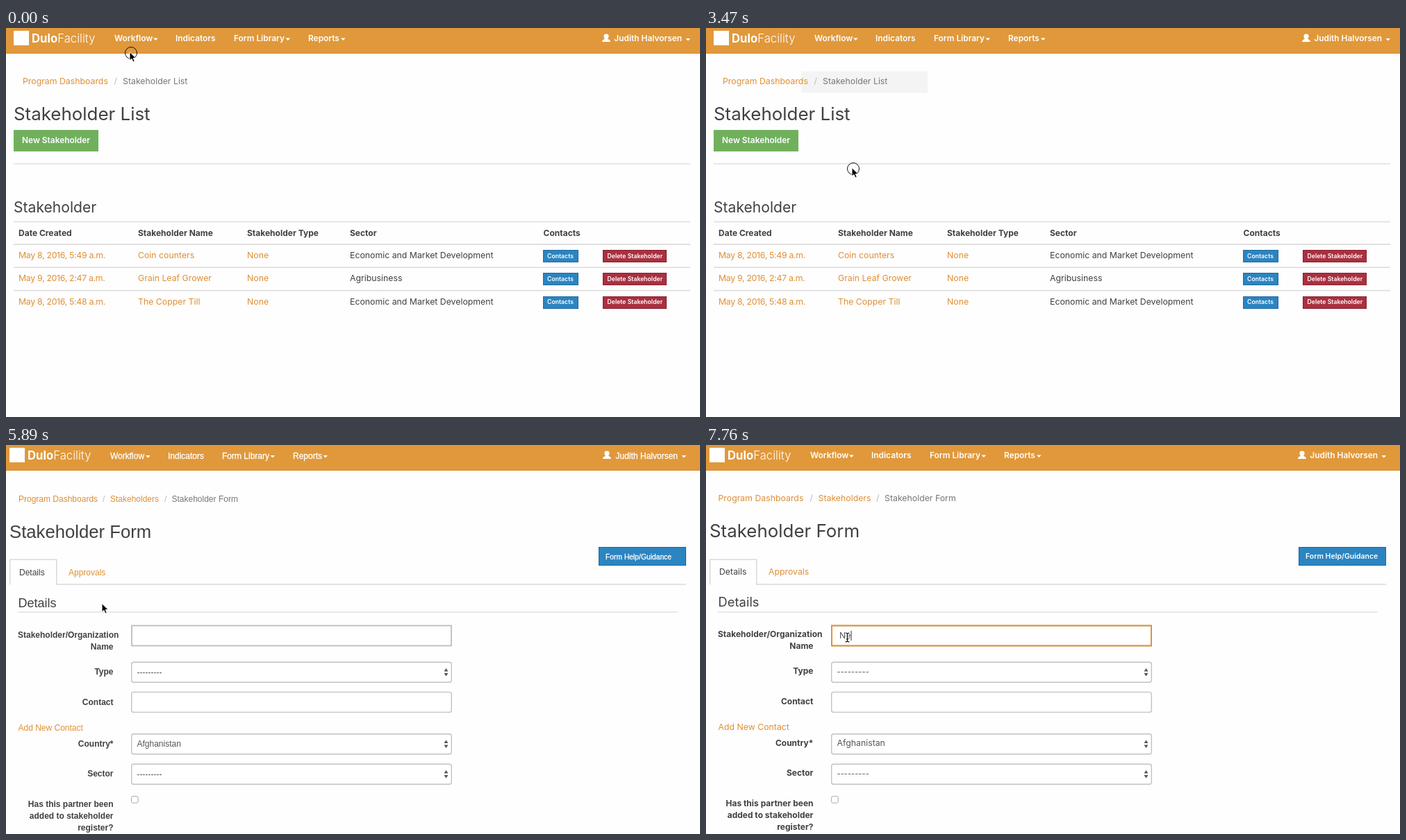
Recreate the animation shown at these times as an HTML page. Size 999 by 561 pixels, loop 8 s.

```html
<!DOCTYPE html>
<html lang="en">
<head>
<meta charset="utf-8">
<title>Stakeholder form</title>
<style>
html, body { margin: 0; width: 100%; height: 100%; overflow: hidden; background: #fefefe; }
svg { display: block; width: 999px; height: 561px; }
text { font: 400 12.3px Inter, sans-serif; font-optical-sizing: none; fill: #404040; white-space: pre; }
.link { fill: #de8f35; }
.date { letter-spacing: -.3px; }
.muted { fill: #777; }
.slash { fill: #bbb; }
.bold { font-weight: 700; font-size: 12px; }
.end { text-anchor: end; }
.h2 { font-size: 25.9px; }
.h3 { font-size: 21.1px; }
.legend { font-size: 18.4px; }
.field { fill: #555; }
.dash { font-size: 11.2px; }
.nav, .btn { fill: #fff; font-weight: 600; font-size: 11.9px; }
.small { font-size: 8.7px; }
.help { font-size: 10.5px; }
.sys text { font-family: "Liberation Sans", Arial, sans-serif; font-size: 12px; transform: translateY(1px); }
.sys .h2 { font-size: 25.7px; transform: translateY(1.5px); }
.sys .legend { font-size: 18px; }
.sys .help { font-size: 10.3px; }
.sys .nav, .sys .btn { font-weight: 400; stroke: #fff; stroke-width: .3px; }
.sys .logo { font-family: Inter, sans-serif; transform: none; }
text.logo, .sys text.logo { font-size: 16.7px; font-weight: 300; fill: #fff; }
.logo tspan { font-weight: 700; }
</style>
</head>
<body>
<svg id="stage" viewBox="0 0 999 561" xmlns="http://www.w3.org/2000/svg"></svg>
<script>
const LOOP = 8000;
const stage = document.getElementById('stage');

const text = (x, y, s, cls = '') => `<text x="${x}" y="${y}" class="${cls}">${s}</text>`;
const rect = (x, y, w, h, fill, extra = '') =>
  `<rect x="${x}" y="${y}" width="${w}" height="${h}" fill="${fill}" ${extra}/>`;
const path = (d, fill, extra = '') => `<path d="${d}" fill="${fill}" ${extra}/>`;
const group = (id, body, extra = '') => `<g id="${id}" ${extra}>${body}</g>`;
const line = (x1, x2, y, color = '#ddd', w = 1.6) => rect(x1, y - w / 2, x2 - x1, w, color);
const caret = (x, y = 14.5) => path(`M${x} ${y}h6.6l-3.3 3.5z`, '#fff');
const button = (x, y, w, h, fill, edge) =>
  rect(x + .5, y + .5, w - 1, h - 1, fill, `stroke="${edge}"`);

// Label, x and caret x, for the web font and for the system font
const NAV = [
  ['Workflow', [156, 212], [156, 207]],
  ['Indicators', [244], [239]],
  ['Form Library', [328, 402.5], [317, 386.5]],
  ['Reports', [435, 482], [419, 462.5]],
];

function navBar(shift, sys) {
  const items = NAV.map(([label, web, fallback]) => {
    const [x, cx] = sys ? fallback : web;
    return text(x, 19, label, 'nav') + (cx ? caret(cx, sys ? 15 : 14.5) : '');
  }).join('');
  const ux = sys ? 865 : 858;
  const user = path(`M${ux} 20q0-3 4-4.2q-1.6-1.5-1.6-4q0-3.4 3.6-3.4t3.6 3.4q0 2.5-1.6 4q4 1.2 4 4.2z`, '#fff');
  return `<g transform="translate(${shift})">` + rect(11, 4, 22, 21, '#fff') +
    text(37, 20.5, '<tspan>Dulo</tspan>Facility', 'logo') + items + user +
    text(973, 19, 'Judith Halvorsen', 'nav end') + caret(978.5, 15) + '</g>';
}

const crumbs = list => list.map(([x, s, cls]) => text(x, 81, s, cls)).join('');

const ROWS = [
  ['May 8, 2016, 5:49 a.m.', 'Coin counters', 'Economic and Market Development'],
  ['May 9, 2016, 2:47 a.m.', 'Grain Leaf Grower', 'Agribusiness'],
  ['May 8, 2016, 5:48 a.m.', 'The Copper Till', 'Economic and Market Development'],
];
const HEADS = [[18, 'Date Created'], [190, 'Stakeholder Name'], [347, 'Stakeholder Type'],
  [495, 'Sector'], [773.5, 'Contacts']];

function listPage() {
  const rows = ROWS.map(([date, name, sector], i) => {
    const y = 332 + i * 33.3;
    const top = Math.round(y - 12);
    return text(18, y, date, 'link date') + text(190, y, name, 'link') + text(347, y, 'None', 'link') +
      text(495, y, sector) +
      button(773, top, 51, 18, '#2b85c1', '#1d6aa1') + text(779, y - .5, 'Contacts', 'btn small') +
      button(859, top, 92, 18, '#aa3040', '#8a2030') + text(865.5, y - .5, 'Delete Stakeholder', 'btn small') +
      (i ? line(11, 985, y - 20) : '');
  }).join('');
  return group('crumbBg', rect(137, 62.5, 182, 31, '#f4f4f4')) +
    group('navHot', rect(143.5, 0, 88, 37, '#ba7f31')) + navBar(0, false) +
    crumbs([[24, 'Program Dashboards', 'link'], [155.5, '/', 'slash'], [168, 'Stakeholder List', 'muted']]) +
    text(11, 132.5, 'Stakeholder List', 'h2') +
    rect(11, 147, 122, 31, '#70b05c') +
    group('btnHot', button(11, 147, 122, 31, '#5b9545', '#3e7a30')) +
    text(23, 166, 'New Stakeholder', 'btn') +
    line(11, 985, 195.7, '#e2e2e2') + text(11, 265.5, 'Stakeholder', 'h3') +
    line(11, 985, 279.5) + HEADS.map(([x, s]) => text(x, 299.5, s, 'bold')).join('') +
    line(11, 985, 312, '#d8d8d8') + rows + group('menu', menu());
}

function menu() {
  const items = ['Program Dashboard', 'Documents', 'Sites', 'Stakeholders'].map((s, i) => {
    const y = 57 + i * 22.3;
    let icon = `<circle cx="168" cy="${y - 4.7}" r="5.2" fill="none" stroke="#404040" stroke-width="1.5"/>` +
      path(`M168 ${y - 4}l-2-3.5`, 'none', 'stroke="#404040" stroke-width="1.3"');
    if (i) icon = [0, 1, 2, 3].map(k => {
      const ry = y - 9.5 + k * 2.7;
      return rect(162, ry, 2.4, 1.9, '#404040') + rect(165.4, ry, 9, 1.9, '#404040');
    }).join('');
    return icon + text(177, y, s);
  }).join('');
  return rect(144.5, 37.5, 169, 99.5, '#fff',
    'stroke="#c8c8c8" style="filter:drop-shadow(0 4px 4px rgba(0,0,0,.2))"') +
    group('menuHot', rect(145, 109.5, 168, 22.5, '#f4f4f4')) + items;
}

const formTop = (x, sys) => navBar(x - 11, sys) + crumbs(sys
  ? [[x + 13, 'Program Dashboards', 'link'], [x + 134, '/', 'slash'], [x + 145, 'Stakeholders', 'link'],
    [x + 223, '/', 'slash'], [x + 233.5, 'Stakeholder Form', 'muted']]
  : [[17.5, 'Program Dashboards', 'link'], [149.5, '/', 'slash'], [161.5, 'Stakeholders', 'link'],
    [245, '/', 'slash'], [257, 'Stakeholder Form', 'muted']]) +
  text(x, 132.5, 'Stakeholder Form', 'h2');

const LABELS = [[294, 'Name'], [330, 'Type'], [374, 'Contact'], [434, 'Country*'], [477, 'Sector'],
  [521, 'Has this partner been'], [538, 'added to stakeholder'], [555, 'register?']];

function box(y, value, cls = '') {
  const arrows = path(`M630.5 ${y + 14}l3-4.5 3 4.5zm0 2.5h6l-3 4.5z`, '#555');
  return rect(180.7, y + .7, 460.6, 29, '#fff', 'rx="3" stroke="#c2c2c2" stroke-width="1.4"') +
    (value ? text(188.5, y + 18, value, 'field ' + cls) + arrows : '');
}

function formPage(sys) {
  return formTop(5, sys) +
    button(853, 147, 126, 27, '#2b85c1', '#1d6aa1') + text(863, 163.5, 'Form Help/Guidance', 'btn help') +
    path('M5.7 201.5V165.2H72.8V201H979', 'none', 'stroke="#d9d9d9" stroke-width="1.5"') +
    text(19, 186.5, 'Details') + text(90, 186.5, 'Approvals', 'link') +
    text(17.5, 233, 'Details', 'legend') + line(17, 967, 241, '#e4e4e4') +
    text(17, 277, 'Stakeholder/Organization', 'bold') +
    LABELS.map(([y, s]) => text(154.5, y, s, 'bold end')).join('') +
    rect(181, 260.5, 460, 29, '#fff', 'stroke="#bdbdbd" stroke-width="1.8"') +
    box(312.5, '---------', 'dash') + box(355.7) + box(416, 'Afghanistan') + box(459.5, '---------', 'dash') +
    text(17.5, 410.5, 'Add New Contact', 'link') +
    rect(180.6, 506.6, 9.6, 9.6, '#fff', 'rx="2" stroke="#aaa"');
}

const CURSORS = {
  arrow: path('M-2-1.5V11L.9 8.3 3 13l2.2-1-2-4.4H7.2z', '#000', 'stroke="#fff" stroke-width="1"'),
  hand: path('M-1.3 7.5V1.6Q-1.3.4 0 .4T1.3 1.6V5.6Q2.3 4.6 3.3 5.7 4.5 5 5.2 6.3 6.8 6 6.8 7.7V10.4Q6.5 12.5 5.5 14.5H-.2Q-1.5 11.6-4 9-4.5 7.3-2.9 7.4z',
    '#fff', 'stroke="#000" stroke-width="1.1" stroke-linejoin="round"') +
    path('M1 9v3M3 9v3M5 9v3', 'none', 'stroke="#000" stroke-width=".7"'),
  beam: ['#fff" stroke-width="2.6', '#111" stroke-width="1.2'].map(s =>
    path('M-2.8-6.5Q0-6.5 0-4.8 0-6.5 2.8-6.5M0-5V5M-2.8 6.5Q0 6.5 0 4.8 0 6.5 2.8 6.5M-1.7 2.5H1.7',
      'none', `stroke="${s}"`)).join(''),
};

stage.innerHTML = rect(0, 0, 999, 561, '#fefefe') + rect(0, 0, 999, 37, '#e0983b') +
  rect(0, 36, 999, 1, '#d88e30') +
  group('list', listPage()) +
  group('loading', formTop(11, true), 'class="sys"') +
  group('plain', formPage(true), 'class="sys"') +
  group('form', formPage(false)) +
  group('focus', rect(181, 260.5, 460, 29, 'none', 'stroke="#e0933a" stroke-width="2"')) +
  group('suggest', rect(180.5, 290.5, 461, 102, '#fff', 'stroke="#c8c8c8"')) +
  text(192, 279, '', 'field typed') +
  group('bar', rect(0, 268, 1, 14, '#333')) +
  group('pointer', '<circle id="ring" r="8.5" fill="none" stroke="#111"/>' +
    Object.entries(CURSORS).map(([id, body]) => group(id, body)).join(''));

// Each step changes only the listed values
const STEPS = [
  [0, { page: 'list', cursor: 'arrow', at: [180, 36], ring: 1, typed: '', bar: 0 }],
  [260, { cursor: 'hand', at: [186, 9], ring: 0 }],
  [530, { ring: 1 }],
  [800, { menu: 1, navHot: 1, crumbBg: 1 }],
  [1070, { menu: 0, ring: 0 }],
  [1340, { at: [186, 17] }],
  [1600, { menu: 1, ring: 1 }],
  [1870, { ring: 0 }],
  [2130, { cursor: 'arrow', at: [222, 140] }],
  [2400, { cursor: 'hand', at: [227, 125.5], menuHot: 1 }],
  [3210, { cursor: 'arrow', at: [212, 203], menuHot: 0 }],
  [3470, { menu: 0, navHot: 0, ring: 1 }],
  [3740, { at: [93, 181], ring: 0 }],
  [4010, { cursor: 'hand', at: [85, 166.5], btnHot: 1 }],
  [4280, { ring: 1 }],
  [4550, { ring: 0 }],
  [5620, { page: 'loading' }],
  [5890, { page: 'plain', cursor: 'arrow', at: [140, 230] }],
  [6160, { page: 'form', cursor: 'beam', at: [191, 287.5] }],
  [6430, { at: [201, 287] }],
  [6690, { at: [203.5, 277.5], ring: 1, bar: 192 }],
  [6960, { focus: 1, ring: 0 }],
  [7230, { bar: 0 }],
  [7490, { typed: 'N', suggest: 1, bar: 202 }],
  [7760, { typed: 'Ne', suggest: 0, bar: 208.5 }],
];

const $ = id => document.getElementById(id);
const typed = stage.querySelector('.typed');
const show = (id, on) => { $(id).style.display = on ? '' : 'none'; };

function apply(s) {
  ['list', 'loading', 'plain', 'form'].forEach(id => show(id, id === s.page));
  Object.keys(CURSORS).forEach(id => show(id, id === s.cursor));
  ['menu', 'menuHot', 'navHot', 'crumbBg', 'btnHot', 'focus', 'suggest', 'ring', 'bar'].forEach(id => show(id, s[id]));
  $('pointer').setAttribute('transform', `translate(${s.at})`);
  $('bar').setAttribute('transform', `translate(${s.bar})`);
  typed.textContent = s.typed;
}

let last = -1;
const start = performance.now();
function tick() {
  const t = Math.max(0, performance.now() - start) % LOOP;
  const count = STEPS.filter(([at]) => at <= t).length;
  if (count !== last) {
    last = count;
    apply(Object.assign({}, ...STEPS.slice(0, count).map(([, change]) => change)));
  }
  requestAnimationFrame(tick);
}
tick();
</script>
</body>
</html>
```
